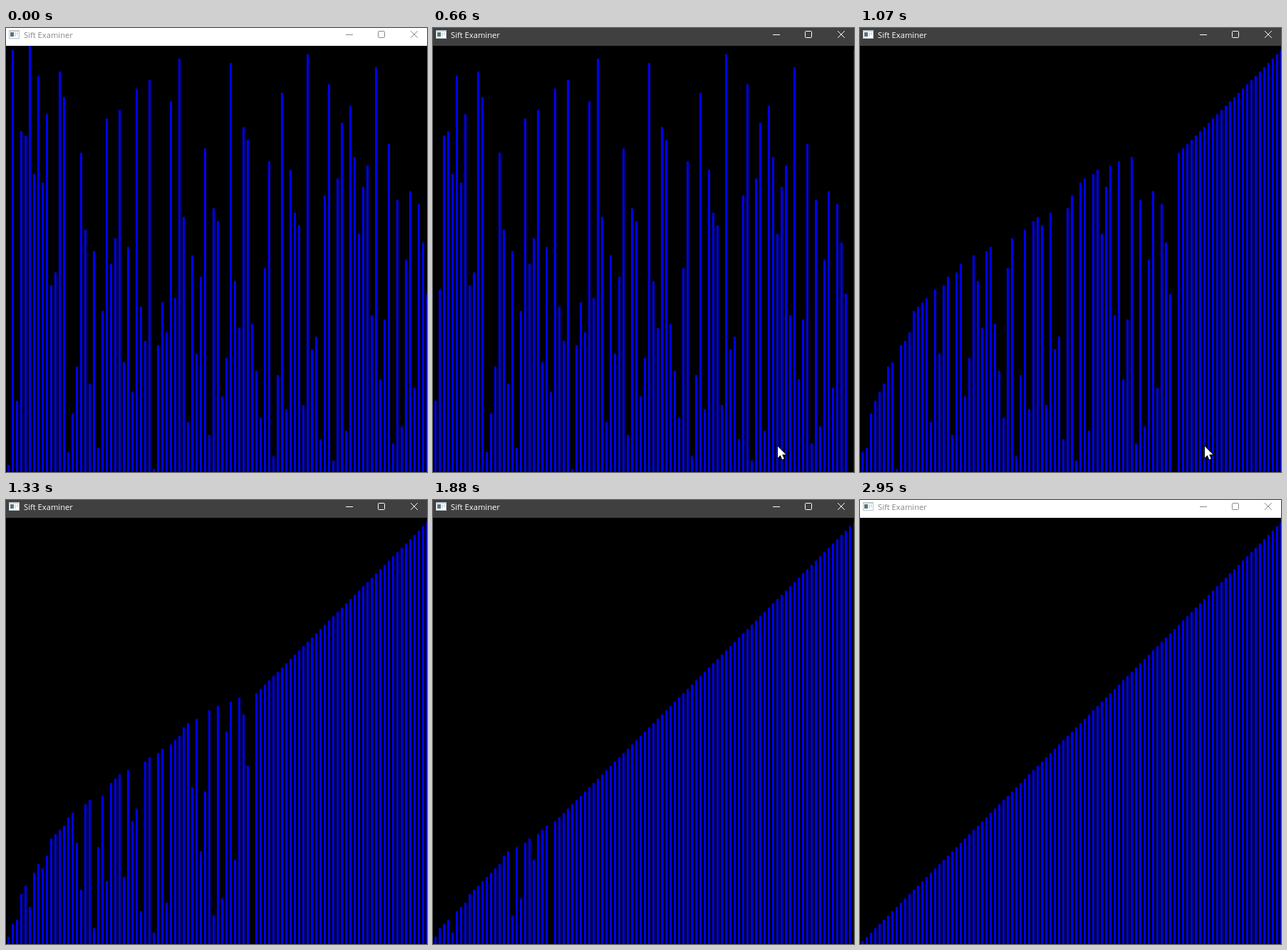
An HTML page with a canvas for the animation above (3.02 s loop, 591 px wide and 623 px high).

```html
<!DOCTYPE html>
<html lang="en">
<head>
<meta charset="utf-8">
<title>Sift Examiner</title>
<style>
  html, body { margin: 0; width: 100%; height: 100%; overflow: hidden; background: #000; }
  #bar { position: absolute; left: 0; top: 0; width: 591px; height: 25px; }
  #bar span { position: absolute; left: 25px; top: 2px; white-space: nowrap;
    font: 11.2px/16px "Open Sans", "Noto Sans", sans-serif; }
  #bar svg { position: absolute; left: 0; top: 0; }
  canvas { position: absolute; left: 0; top: 25px; }
  #cursor { position: absolute; left: 484px; top: 587px; overflow: visible; }
</style>
</head>
<body>
<div id="bar">
  <svg width="591" height="25" fill="none" stroke="currentColor">
    <g stroke="none">
      <path fill="#bcc8d0" d="M4 3h15v12H4z"/>
      <path fill="#fff" d="M5 5h13v9H5z"/>
      <path fill="#5b7478" d="M6 6h5v6H6z"/>
      <path fill="#d5e0e8" d="M12 6h2v6h-2zM15 6h2v4h-2z"/>
    </g>
    <path d="M477 9.5h10"/>
    <rect x="522.5" y="4.5" width="9" height="9" rx="1"/>
    <path d="M568.5 4.5l9 9M577.5 4.5l-9 9" stroke-linecap="square"/>
  </svg>
  <span>Sift Examiner</span>
</div>
<canvas width="591" height="598"></canvas>
<svg id="cursor" width="12" height="19">
  <path d="M0 0v16l3.700-3.600 2.600 6 2.500-1.100-2.600-5.800h5.200z"
    fill="#fff" stroke="#000" stroke-width="2" paint-order="stroke"/>
</svg>
<script>
const LOOP = 3020, COUNT = 100, SORT_START = 655, TICK = 67.5;

const bar = document.getElementById("bar");
const cursor = document.getElementById("cursor");
const ctx = document.querySelector("canvas").getContext("2d");

// Linear congruential generator with 15-bit output
let seed = 1;
function rand() {
  seed = (Math.imul(seed, 214013) + 2531011) | 0;
  return (seed >> 16) & 0x7fff;
}

function swap(a, i, j) { [a[i], a[j]] = [a[j], a[i]]; }

function shuffled(count) {
  const a = Array.from({ length: count }, (_, i) => i);
  for (let i = count - 1; i > 0; i--) swap(a, i, rand() % (i + 1));
  return a;
}

function bubblePass(list) {
  const a = [...list];
  for (let i = 0; i < a.length - 1; i++) if (a[i] > a[i + 1]) swap(a, i, i + 1);
  return a;
}

const states = [shuffled(COUNT)];
while (states.length <= COUNT) states.push(bubblePass(states.at(-1)));

// About four passes per tick, slowing slightly
function passesAt(t) {
  const n = Math.floor((t - SORT_START) / TICK);
  return n < 0 ? 0 : Math.min(COUNT, 2 + 4 * n - Math.floor(n * n / 160));
}

// Unsorted bars stand one slot to the left of the sorted ones.
function drawBars(done) {
  ctx.fillStyle = "#000";
  ctx.fillRect(0, 0, 591, 598);
  ctx.fillStyle = "#00f";
  states[done].forEach((v, i) => {
    const slot = i < COUNT - done ? i - 1 : i;
    ctx.fillRect(2 + 6 * slot, 594 - 6 * v, 3, 4 + 6 * v);
  });
}

// 0 = inactive window, 1 = active window
function focusAt(t) {
  if (t < 270 || t >= 2950) return 0;
  return t < 340 ? 0.4 : t < 410 ? 0.8 : 1;
}

function grey(from, to, f) {
  const g = Math.round(from + (to - from) * f);
  return `rgb(${g},${g},${g})`;
}

let shown = -1;
function frame(now) {
  const t = now % LOOP, done = passesAt(t), focus = focusAt(t);
  if (done !== shown) drawBars(shown = done);
  bar.style.background = grey(255, 64, focus);
  bar.style.color = grey(135, 255, focus);
  cursor.style.display = t >= 70 && t < 1200 ? "block" : "none";
  requestAnimationFrame(frame);
}
frame(0);
</script>
</body>
</html>
```
